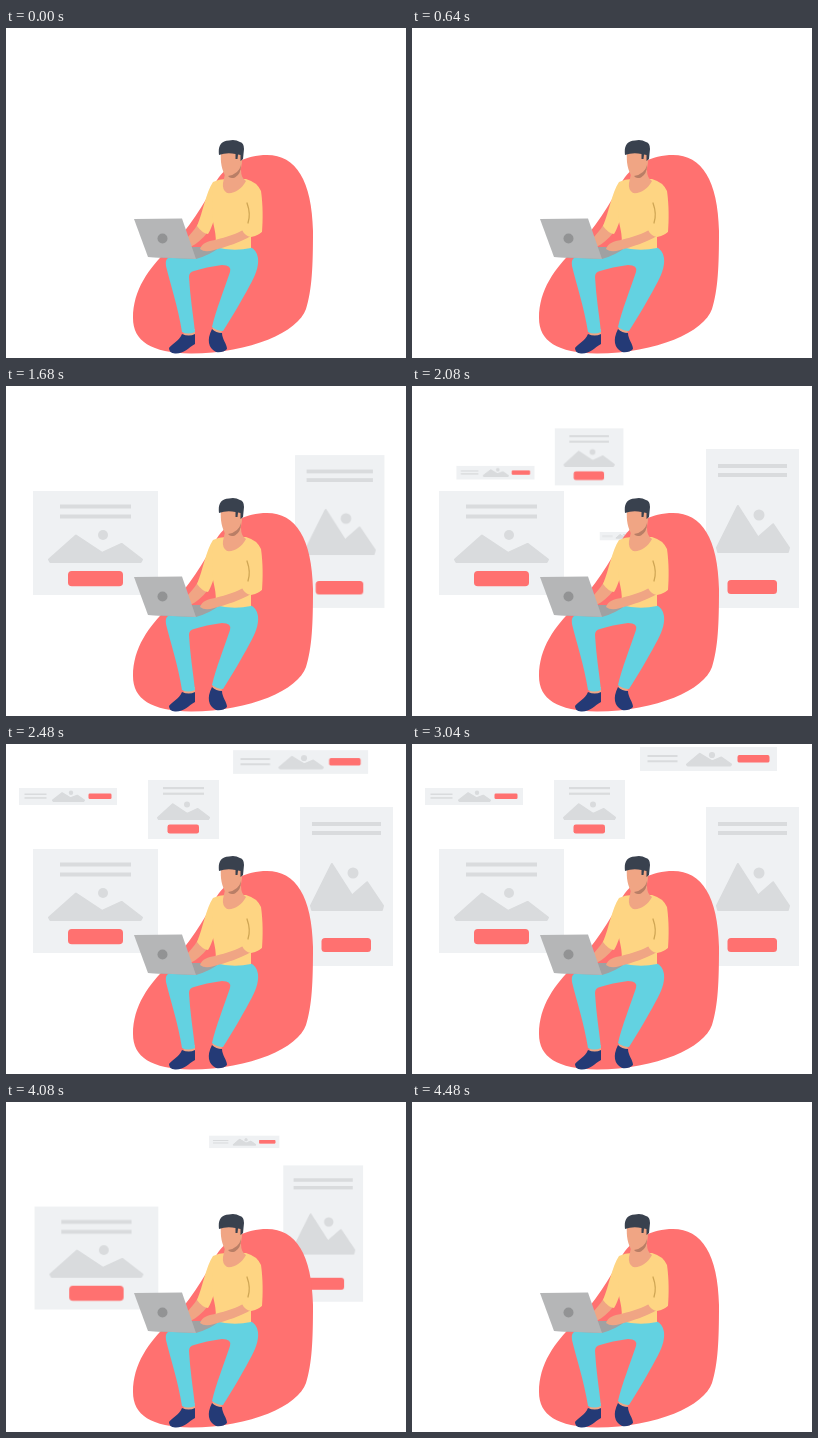
These frames come from a looping animation (400x330 px, 4.56 s). An HTML page:

```html
<!DOCTYPE html>
<html lang="en">
<head>
<meta charset="utf-8">
<title>Responsive layouts</title>
<style>
  html, body { margin: 0; width: 100%; height: 100%; overflow: hidden; background: #fff; }
  svg { display: block; width: 400px; height: 330px; }
  .card { fill: #eff1f3; }
  .grey { fill: #d9dbdd; }
  .hill { fill: #d9dbdd; stroke: #d9dbdd; stroke-width: 2; stroke-linejoin: round; }
  .red { fill: #ff7170; }
  .skin { fill: #f0a584; }
  .shirt { fill: #fed583; }
  .fold { fill: none; stroke: #cfa654; stroke-width: 1.3; stroke-linecap: round; }
  .jeans { fill: #63d2e1; }
  .shoe { fill: #243a76; }
  .hair { fill: #39414e; }
</style>
</head>
<body>
<svg viewBox="0 0 400 330">
  <g id="cards"></g>

  <path class="red" d="M261 127C290 127 306 153 307 203C307 238 306 262 300 281C292 304 245 325 185 325.5C145 325 127 313 127 290C127 262 143 240 161 223C184 200 197 177 211 152C221 137 240 127 261 127Z"/>

  <!-- legs -->
  <path class="skin" d="M177 301H189V309H178ZM207 298L217 301L214 307L206 305Z"/>
  <path class="jeans" d="M162 230L210 219L244 219Q251 222 252 230C253 239 249 248 244 257C235 274 227 287 217 303Q211 303 206 299C210 282 218 262 224 244Q226 237 216 237Q200 239 188 243Q183 244 183 249C184 268 187 286 189 304Q182 307 176 304C172 279 164 255 160 238Q159 232 162 230Z"/>
  <path class="shoe" d="M176 306Q183 309 189 306L189 316C182 320 178 326 169 325.5Q163 325 163 320C167 315 173 313 176 306ZM206 301Q210 305 216 305C216 311 221 316 221 321Q217 325 210 324Q204 321 203 315Q202 309 206 301Z"/>

  <!-- far arm and torso -->
  <path class="skin" d="M192 196L202 204C196 211 191 216 184 219L178 214C183 207 188 203 192 196Z"/>
  <path class="shirt" d="M207 154C200 164 197 184 191 198Q196 205 202 206C206 200 207 192 211 188Z"/>
  <path class="shirt" d="M207 154Q213 151 220 151L240 151Q251 154 255 163C257 177 257 192 256 204Q250 208 245 207L245 220Q227 224 209 219C212 207 206 196 206 184Z"/>
  <path class="skin" d="M219 146L235 142Q235 150 240 153C236 161 228 166 221 165Q216 162 217 155Z"/>

  <!-- laptop base and near arm -->
  <path fill="#a0a1a2" d="M183 219H214Q204 227 190 231L142 229Z"/>
  <path class="skin" d="M239 201L245 208C235 214 220 219 208 222Q199 225 194 221C196 215 202 213 209 212C221 209 230 206 239 201Z"/>
  <path class="shirt" d="M243 174C244 186 242 193 236 202Q239 208 245 209Q254 207 256 203L255 168Z"/>
  <path class="fold" d="M241 175Q245 186 242 195"/>

  <!-- head -->
  <path class="skin" d="M215 124L236 124C237 135 235 144 230 148Q225 152 220 149C216 143 214 134 215 124Z"/>
  <path fill="#b97e66" d="M235 137Q233 146 222 148Q224 151 229 149.5Q235 146 235 137Z"/>
  <path class="hair" d="M213 127C212 119 214 113 223 112.5Q229 111 234 114Q238 115 238 121L237 131L234.5 133V127L232 126.5L231.5 131L229.5 131V126Q221 124 213 127Z"/>

  <!-- laptop lid -->
  <path fill="#b5b6b7" d="M128 191L176 190.5L190 231L142 229Z"/>
  <circle cx="156.5" cy="210.5" r="5" fill="#929394"/>
</svg>
<script>
const LOOP = 4560, GROW = 640, SHRINK = 310;
const OUT = 'cubic-bezier(.3333,1,.6667,1)', IN = 'cubic-bezier(.3333,0,.6667,0)';
const BORN = 'translate(167px,220px) scale(0)';
const GONE = 'translate(177px,66px) scale(0)';
const FULL = 'translate(0px,0px) scale(1)';

// Boxes are [x, y, width, height]; dips are the heights of the valley and second peak.
const cards = [
  { box: [27, 105, 125, 104], lines: [54, 118.5, 71, 4], gap: 10, hill: [42, 148, 95, 29],
    dips: [.66, .33], sun: [97, 149, 5], button: [62, 185, 55, 15.3], open: 882, close: 4013 },
  { box: [294, 63, 93, 159], lines: [306, 78, 69, 4], gap: 9, hill: [304, 118, 74, 49],
    dips: [.69, .41], sun: [347, 129, 5.5], button: [315.5, 194, 49.5, 14], open: 1258, close: 3919 },
  { box: [142, 36, 71, 59], lines: [157, 43, 41, 2.2], gap: 5.6, hill: [151, 59, 53, 17],
    dips: [.66, .33], sun: [181, 60.5, 3], button: [161.5, 80.5, 31.5, 9], open: 1650, close: 3660 },
  { box: [13, 44, 98, 17], lines: [18.5, 49.5, 22, 1.5], gap: 3.7, hill: [46, 48, 33, 10],
    dips: [.66, .33], sun: [65, 48.8, 2.2], button: [82.5, 49.5, 23, 5.5], open: 1818, close: 3749 },
  { box: [228, 3, 137, 24], lines: [235.5, 11, 30, 2], gap: 5.3, hill: [274, 8.5, 46, 14],
    dips: [.66, .33], sun: [300, 11, 3.1], button: [325.5, 11, 32, 7.5], open: 1998, close: 3837 }
];

const rect = (cls, [x, y, w, h], r = 0) =>
  `<rect class="${cls}" x="${x}" y="${y}" width="${w}" height="${h}" rx="${r}"/>`;

function hill([x, y, w, h], [valley, peak]) {
  const outline = [[0, .91], [.29, .02], [.57, valley], [.78, peak], [1, .91], [.985, 1], [.015, 1]];
  const points = outline.map(([u, v]) => [x + 1 + u * (w - 2), y + 1 + v * (h - 2)]);
  return `<polygon class="hill" points="${points.join(' ')}"/>`;
}

function draw(c) {
  const [x, y, w, h] = c.lines;
  const [cx, cy, r] = c.sun;
  return rect('card', c.box) + rect('grey', c.lines) + rect('grey', [x, y + c.gap, w, h]) +
    hill(c.hill, c.dips) + `<circle class="grey" cx="${cx}" cy="${cy}" r="${r}"/>` +
    rect('red', c.button, c.button[3] / 4);
}

const layer = document.getElementById('cards');
layer.innerHTML = cards.map(c => `<g>${draw(c)}</g>`).join('');

cards.forEach((c, i) => layer.children[i].animate([
  { transform: BORN, offset: 0 },
  { transform: BORN, offset: c.open / LOOP, easing: OUT },
  { transform: FULL, offset: (c.open + GROW) / LOOP },
  { transform: FULL, offset: c.close / LOOP, easing: IN },
  { transform: GONE, offset: (c.close + SHRINK) / LOOP },
  { transform: GONE, offset: 1 }
], { duration: LOOP, iterations: Infinity }));
</script>
</body>
</html>
```
